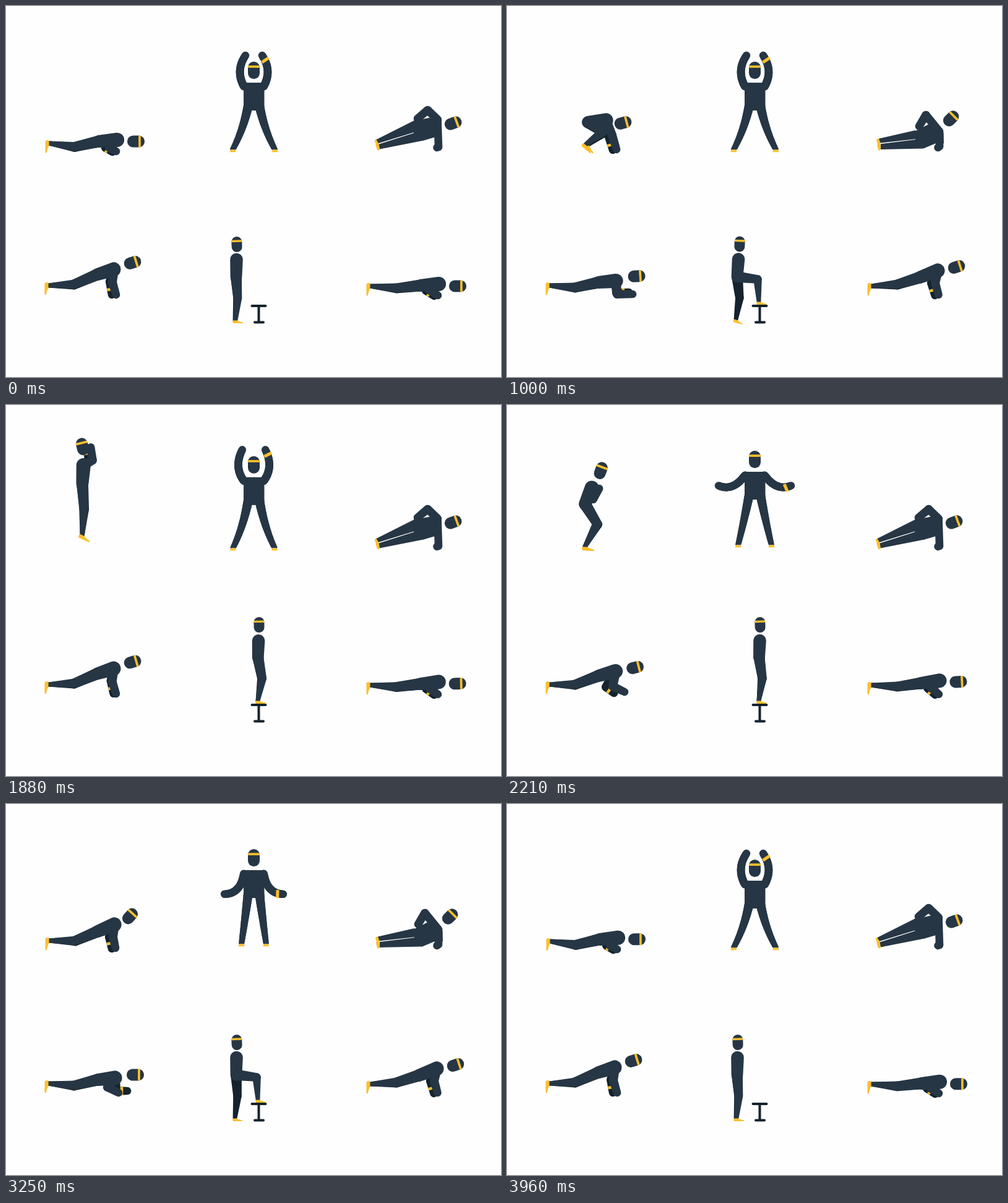
Write an HTML page with a canvas that moves like this. It is 800 by 600 pixels and loops after 4000 ms.

```html
<!DOCTYPE html>
<html lang="en">
<head>
<meta charset="utf-8">
<title>Workout</title>
<style>
html, body { margin: 0; width: 100%; height: 100%; overflow: hidden; background: #fefefe; }
canvas { display: block; }
</style>
</head>
<body>
<canvas id="stage" width="800" height="600"></canvas>
<script>
const LOOP = 4000;
const BODY = '#263645', DARK = '#14232e', GOLD = '#fbbf2d';
const ctx = document.getElementById('stage').getContext('2d');

// Periodic, monotone cubic interpolation; each key is [time, ...values].
function track(period, ...keys) {
  const n = keys.length;
  const key = i => {
    const [t, ...v] = keys[(i + n) % n];
    return { t: t + Math.floor(i / n) * period, v };
  };
  const slope = (a, b, j) => (b.v[j] - a.v[j]) / (b.t - a.t);
  const blend = (p, q) => p * q > 0 ? 2 * p * q / (p + q) : 0;
  return time => {
    const t = time % period;
    let i = n - 1;
    while (i > 0 && keys[i][0] > t) i--;
    const [a, b, c, d] = [i - 1, i, i + 1, i + 2].map(key);
    const h = c.t - b.t, u = (t - b.t) / h, w = 1 - u;
    return b.v.map((v, j) => {
      const s = slope(b, c, j);
      const m0 = blend(slope(a, b, j), s), m1 = blend(s, slope(c, d, j));
      return v * (1 + 2 * u) * w * w + c.v[j] * u * u * (3 - 2 * u)
        + h * u * w * (m0 * w - m1 * u);
    });
  };
}

const shift = ([x, y, ...rest], dx, dy) => [x + dx, y + dy, ...rest];
const mirror = ([x, y]) => [801 - x, y];
const mix = (a, b, u) => a.map((v, i) => v + (b[i] - v) * u);

// Hull of two circles.
function taper(a, ra, b, rb) {
  const dx = b[0] - a[0], dy = b[1] - a[1], d = Math.hypot(dx, dy);
  ctx.beginPath();
  if (d <= Math.abs(ra - rb)) {
    const [p, r] = ra > rb ? [a, ra] : [b, rb];
    ctx.arc(p[0], p[1], r, 0, 7);
  } else {
    const dir = Math.atan2(dy, dx), open = Math.acos((ra - rb) / d);
    ctx.arc(a[0], a[1], ra, dir + open, dir - open);
    ctx.arc(b[0], b[1], rb, dir - open, dir + open);
  }
  ctx.fill();
}

function limb(color, points, radii) {
  ctx.fillStyle = color;
  for (let i = 1; i < points.length; i++) taper(points[i - 1], radii[i - 1], points[i], radii[i]);
}

function bend(a, c, b, ra, rb) {
  const steps = 16, points = [], radii = [];
  for (let i = 0; i <= steps; i++) {
    const u = i / steps;
    points.push(mix(mix(a, c, u), mix(c, b, u), u));
    radii.push(ra + (rb - ra) * u);
  }
  limb(BODY, points, radii);
}

function poly(color, points) {
  ctx.fillStyle = color;
  ctx.beginPath();
  points.forEach(p => ctx.lineTo(p[0], p[1]));
  ctx.fill();
}

function place([x, y], degrees, scale, paint) {
  ctx.save();
  ctx.translate(x, y);
  ctx.rotate(degrees * Math.PI / 180);
  ctx.scale(scale, scale);
  paint();
  ctx.restore();
}

function head(p, scale = 1) {
  place(p, p[2] || 0, scale, () => {
    ctx.fillStyle = BODY;
    ctx.beginPath();
    ctx.roundRect(-9.5, -14, 19, 28, 9.3);
    ctx.fill();
    ctx.fillStyle = GOLD;
    ctx.fillRect(-9.3, -7.8, 18.6, 3.7);
  });
}

function foot(p, scale = 1) {
  place(p, p[2], scale, () => {
    ctx.fillStyle = GOLD;
    ctx.beginPath();
    ctx.moveTo(-4, 0.5);
    ctx.lineTo(4, 0.5);
    ctx.quadraticCurveTo(7, 3, 14.5, 4.2);
    ctx.quadraticCurveTo(16.5, 5.5, 14, 6.3);
    ctx.lineTo(-3.5, 6.3);
    ctx.quadraticCurveTo(-5.5, 3, -4, 0.5);
    ctx.fill();
  });
}

function wristband(from, hand, width, length = 13) {
  const angle = Math.atan2(hand[1] - from[1], hand[0] - from[0]);
  place(hand, angle * 180 / Math.PI, 1, () => {
    ctx.fillStyle = GOLD;
    ctx.fillRect(-9 - width / 2, -length / 2, width, length);
  });
}

function sideFigure(f, t) {
  const at = name => f[name](t);
  const shoulder = at('shoulder'), hip = at('hip'), knee = at('knee'), ankle = at('ankle');
  const elbow = at('elbow'), hand = at('hand');
  const farElbow = f.farElbow ? at('farElbow') : shift(elbow, -6, 0);
  const farHand = f.farHand ? at('farHand') : shift(hand, -6, 1);
  const gap = f.gap ? at('gap')[0] : 0;
  const farAnkle = shift(ankle, gap, 0);
  const legs = [9.5, 7.4, 3.6], arms = [8, 7, 6.3];
  limb(DARK, [hip, shift(knee, 1 + gap * 0.4, 1), farAnkle], legs);
  foot(farAnkle);
  limb(DARK, [shoulder, farElbow, farHand], arms);
  wristband(farElbow, farHand, 4.5);
  limb(BODY, [hip, knee, ankle], legs);
  foot(ankle);
  limb(BODY, [hip, shoulder], [10, 11.6]);
  limb(BODY, [shoulder, elbow, hand], arms);
  head(at('head'));
}

const burpee = {
  head: track(LOOP, [0, 210, 219, 90], [450, 203, 188, 65], [1000, 187.5, 189, 75],
    [1270, 166, 130, 40], [1450, 137, 96, 5], [1580, 120.5, 80, -24], [1800, 121, 60, -20],
    [2030, 134, 92, 5], [2210, 151.5, 106, 20], [2480, 184, 178, 72], [2750, 191, 203.5, 104],
    [3000, 198, 188, 65], [3250, 200.5, 181.5, 42]),
  shoulder: track(LOOP, [0, 179.5, 216.5], [450, 175, 196], [1000, 160, 185], [1270, 148, 148],
    [1450, 132, 122], [1580, 125, 111], [1800, 125, 91], [2030, 127, 120], [2210, 137, 134],
    [2480, 159, 182], [2750, 162.5, 191], [3000, 172, 194], [3250, 175, 195]),
  hip: track(LOOP, [0, 150, 219], [450, 148, 207], [600, 146, 204], [1000, 131, 188],
    [1270, 122, 172], [1450, 123, 150], [1580, 124, 140], [1800, 124, 120], [2030, 122, 149],
    [2210, 126, 160], [2480, 130, 186], [2750, 133, 195], [3000, 145, 205], [3250, 148, 206]),
  knee: track(LOOP, [0, 110, 227.5], [450, 111, 222], [600, 111, 222], [800, 135, 218],
    [1000, 154, 204], [1270, 149, 194], [1450, 132, 186], [1580, 124, 180], [1800, 124, 160],
    [2030, 133, 188], [2210, 145.5, 192], [2480, 152, 206], [2750, 127, 230.5],
    [3000, 112, 223], [3250, 111, 221]),
  ankle: track(LOOP, [0, 70, 222, 90], [600, 70, 221, 90], [800, 98, 216, 70],
    [1000, 127, 224, 40], [1270, 125, 229, 3], [1450, 124, 228, 3], [1580, 123, 220, 3],
    [1800, 123, 200, 35], [2000, 124, 228, 5], [2210, 126, 229, 3], [2480, 126, 225, 35],
    [2750, 90, 221, 88], [2950, 70, 221, 90], [3250, 70, 221, 90]),
  elbow: track(LOOP, [0, 167, 229], [450, 173, 215], [1000, 170, 209], [1270, 160, 172],
    [1450, 148, 120], [1580, 143, 90], [1800, 141, 72], [2030, 138, 140], [2210, 139, 152],
    [2480, 167, 207], [2750, 167, 218], [3250, 173, 215]),
  hand: track(LOOP, [0, 178, 235], [450, 177, 233], [1000, 177, 232], [1270, 172, 190],
    [1450, 155, 110], [1580, 137, 72], [1800, 133, 51], [2030, 148, 120], [2210, 149, 135],
    [2480, 176, 230], [2750, 178, 234], [3250, 177, 233]),
  gap: track(LOOP, [0, 0], [600, 0], [1000, 4], [1270, 0], [2300, 0], [2750, 8], [2950, 0])
};

const plank = {
  head: track(2000, [0, 204.5, 415, 73], [210, 207, 424.5, 76], [750, 209.5, 437, 83],
    [1000, 209.5, 437, 86], [1250, 209, 438, 90], [1580, 206, 423, 83], [1960, 204.5, 415, 73]),
  shoulder: track(2000, [0, 174, 426], [210, 175.5, 430.5], [750, 176, 443.5], [1000, 176, 444.5],
    [1250, 176, 443], [1580, 174, 430], [1960, 174, 426]),
  hip: track(2000, [0, 148, 434], [210, 148, 438], [750, 148, 446], [1000, 148, 447],
    [1250, 148, 446], [1580, 148, 438], [1960, 148, 434]),
  knee: track(2000, [0, 109, 450], [210, 109, 452], [750, 109, 455], [1250, 109, 455],
    [1580, 109, 452], [1960, 109, 450]),
  ankle: track(2000, [0, 69, 452, 90], [1000, 69, 452, 90]),
  elbow: track(2000, [0, 172, 447], [210, 171, 455], [500, 181, 465], [750, 182, 466],
    [1000, 178, 466], [1250, 164, 458], [1580, 167, 450], [1960, 172, 447]),
  hand: track(2000, [0, 178, 467], [210, 190, 464], [500, 203, 466], [1000, 203, 466],
    [1250, 182, 467], [1580, 177, 467], [1960, 178, 467]),
  farElbow: track(2000, [0, 168, 446], [210, 160, 456], [750, 173, 463], [1000, 177, 464],
    [1250, 178, 464], [1580, 183, 447], [1960, 168, 446]),
  farHand: track(2000, [0, 171, 467], [210, 173, 466], [750, 192, 463], [1000, 197, 463],
    [1250, 196, 464], [1580, 195, 464], [1960, 171, 467])
};

const dip = (low, high) => track(2000, [0, ...low], [800, ...high], [1300, ...high]);
const pushup = {
  head: dip([730, 453, 90], [726.5, 422, 72]),
  shoulder: dip([699.5, 449.5], [696, 428]),
  hip: dip([670, 452], [667, 439]),
  knee: dip([630, 456], [630, 450]),
  ankle: dip([589, 453, 90], [589, 453, 90]),
  elbow: dip([685, 460], [692, 448]),
  hand: dip([698, 468], [697.5, 467])
};

const jack = {
  head: track(1000, [0, 104], [60, 103], [210, 88], [250, 87], [300, 88], [500, 104],
    [580, 100], [700, 87.5], [750, 87], [800, 88], [960, 104]),
  arm: track(1000, [0, 370.5, 104.5, 387, 80], [100, 366, 104, 367, 72],
    [210, 365, 140, 342, 130], [250, 379, 145, 353, 145.5], [360, 378, 153, 369, 166],
    [480, 378, 156, 368, 168], [580, 378, 153, 351.5, 155], [660, 362, 134, 343, 116],
    [750, 367, 100, 365.5, 68], [800, 365, 96, 372, 64.5], [960, 370.5, 104.5, 387, 80]),
  leg: track(1000, [0, 383.5, 200, 366.5, 232], [100, 383, 195, 368, 230],
    [210, 383, 188, 373.5, 226], [250, 386, 188, 380.5, 226], [350, 388, 192, 387, 228],
    [480, 388.5, 199, 388, 232], [580, 388, 197, 385.5, 230], [750, 383.5, 192, 369, 229],
    [960, 383.5, 200, 366.5, 232])
};

function drawJack(t) {
  const y = jack.head(t)[0], top = y + 20;
  const [ex, ey, hx, hy] = jack.arm(t), [kx, ky, ax, ay] = jack.leg(t);
  ctx.fillStyle = BODY;
  ctx.fillRect(384, top, 33.5, 45);
  for (const side of [p => p, mirror]) {
    const ankle = side([ax, ay]), hand = side([hx, hy]), elbow = side([ex, ey]);
    bend(side([391.5, top + 37]), side([kx, ky]), ankle, 7.6, 4.5);
    ctx.fillStyle = '#fefefe';
    ctx.fillRect(ankle[0] - 6, ay + 0.5, 12, 5);
    ctx.fillStyle = GOLD;
    ctx.beginPath();
    ctx.ellipse(ankle[0], ay + 4.3, 5, 4.4, 0, Math.PI, 0);
    ctx.fill();
    bend(side([384.5, top + 6]), elbow, hand, 6.6, 6.3);
    if (side === mirror) wristband(elbow, hand, 5);
  }
  head([400.5, y]);
}

const sideDip = track(2000, [0, 0], [190, 0], [700, 1], [1260, 1], [1650, 0]);

function drawSidePlank(t) {
  const u = sideDip(t)[0];
  const m = (a, b) => mix(a, b, u);
  limb(GOLD, [m([598.7, 218.5], [600, 217.5]), m([600, 223], [601, 222])], [2.8, 2.2]);
  limb(GOLD, [m([600.3, 225], [601, 225]), m([601.8, 231.5], [601.8, 231.5])], [2.8, 2]);
  poly(BODY, [m([598.5, 216], [601, 214.5]), m([660, 185], [660, 201]),
    m([662, 203.5], [662, 215]), m([602, 222], [603.5, 221.5])]);
  poly(BODY, [m([602.5, 223.5], [604, 223]), m([659, 205.5], [661, 216]),
    m([675, 217.5], [673, 230.5]), m([604, 231.5], [604, 232])]);
  poly(BODY, [m([659, 186], [660, 202]), m([690, 179.5], [684, 190]), m([704, 182], [705, 203]),
    m([704, 201], [706, 222]), m([692, 212.5], [692, 222.5]), m([675, 217.5], [673, 230.5]),
    m([659, 219], [660, 226])]);
  limb(BODY, [m([697.5, 183.5], [699, 203]), m([681.5, 168.5], [677, 176.5]),
    m([665, 182], [666, 194.5])], [6.5, 6.8, 6.3]);
  limb(BODY, [m([697.8, 190], [699.5, 207]), m([699, 228], [699, 227])], [6.2, 6.3]);
  limb(BODY, [m([699, 228], [699, 227]), m([696.5, 229], [696.5, 229])], [6.3, 6.3]);
  head(m([722.7, 189.5, 70], [717.7, 182, 45]));
}

const step = {
  head: track(LOOP, [0, 373, 385.5, -2], [500, 374, 385.5, 0], [1000, 376, 385, 2],
    [1300, 396, 373, 8], [1580, 408.5, 357, -1], [1900, 409, 355.5, -1], [2210, 409, 355.5, -2],
    [2750, 408.5, 368, 7], [3000, 385, 382, 4], [3250, 373, 385.5, -2]),
  shoulder: track(LOOP, [0, 372.5, 410], [1000, 374, 409.5], [1300, 392, 398],
    [1580, 407, 382], [2210, 408.5, 381], [2750, 403, 393], [3000, 382, 408], [3250, 372.5, 410]),
  hip: track(LOOP, [0, 372, 438], [1000, 372, 438], [1300, 388, 426], [1580, 406.5, 408],
    [2210, 407.5, 408], [2750, 399, 418], [3000, 380, 434], [3250, 372, 438]),
  knee: track(LOOP, [0, 374.5, 472], [450, 397, 444], [800, 405, 442], [1000, 405, 442],
    [1300, 417, 444], [1580, 416, 442], [2210, 413, 442], [2750, 420, 444], [3000, 410, 443],
    [3250, 405, 442], [3450, 404, 442], [3650, 396, 448], [3900, 374.5, 472]),
  ankle: track(LOOP, [0, 371, 508, 0], [450, 388, 478, 20], [750, 407, 478, 0],
    [3400, 407, 478, 0], [3620, 388, 482, 15], [3900, 371, 508, 0]),
  farKnee: track(LOOP, [0, 374, 472], [1050, 376, 472], [1300, 398, 448], [1500, 414, 442],
    [2210, 412, 442], [2500, 416, 444], [2750, 411, 445], [3050, 376, 472], [3250, 374, 472]),
  farAnkle: track(LOOP, [0, 370, 508, 0], [850, 370, 508, 0], [1000, 370, 507, 15],
    [1150, 371, 503, 30], [1350, 388, 480, 20], [1550, 407, 478, 0], [2250, 407, 478, 0],
    [2500, 402, 470, 20], [2750, 390, 472, 25], [3050, 370, 508, 0]),
  farHand: track(LOOP, [0, 373, 435], [1000, 375, 435], [1300, 398, 430], [1580, 419.5, 415],
    [1900, 409, 409], [2210, 409, 409], [2750, 415.5, 427], [3250, 373, 435])
};

function drawStep(t) {
  const p = {};
  for (const name in step) p[name] = step[name](t);
  const legs = [9, 6.8, 3.4];
  ctx.strokeStyle = DARK;
  ctx.lineWidth = 4;
  ctx.lineCap = 'round';
  ctx.beginPath();
  for (const [x1, y1, x2, y2] of [[397.5, 485, 419.5, 485], [408.5, 485, 408.5, 511], [402, 511.5, 416, 511.5]]) {
    ctx.moveTo(x1, y1);
    ctx.lineTo(x2, y2);
  }
  ctx.stroke();
  const farElbow = shift(mix(p.shoulder, p.farHand, 0.5), 2, 0);
  limb(DARK, [p.shoulder, farElbow, p.farHand], [7, 6, 5.4]);
  wristband(farElbow, p.farHand, 4, 10.5);
  limb(DARK, [p.hip, p.farKnee, p.farAnkle], legs);
  foot(p.farAnkle, 0.8);
  limb(BODY, [p.hip, p.knee, p.ankle], legs);
  foot(p.ankle, 0.8);
  limb(BODY, [p.shoulder, p.hip], [10.3, 9.4]);
  head(p.head, 0.89);
}

const start = performance.now();
function frame() {
  const t = (performance.now() - start) % LOOP;
  ctx.fillStyle = '#fefefe';
  ctx.fillRect(0, 0, 800, 600);
  sideFigure(burpee, t);
  drawJack(t);
  drawSidePlank(t);
  sideFigure(plank, t);
  drawStep(t);
  sideFigure(pushup, t);
  requestAnimationFrame(frame);
}
frame();
</script>
</body>
</html>
```
